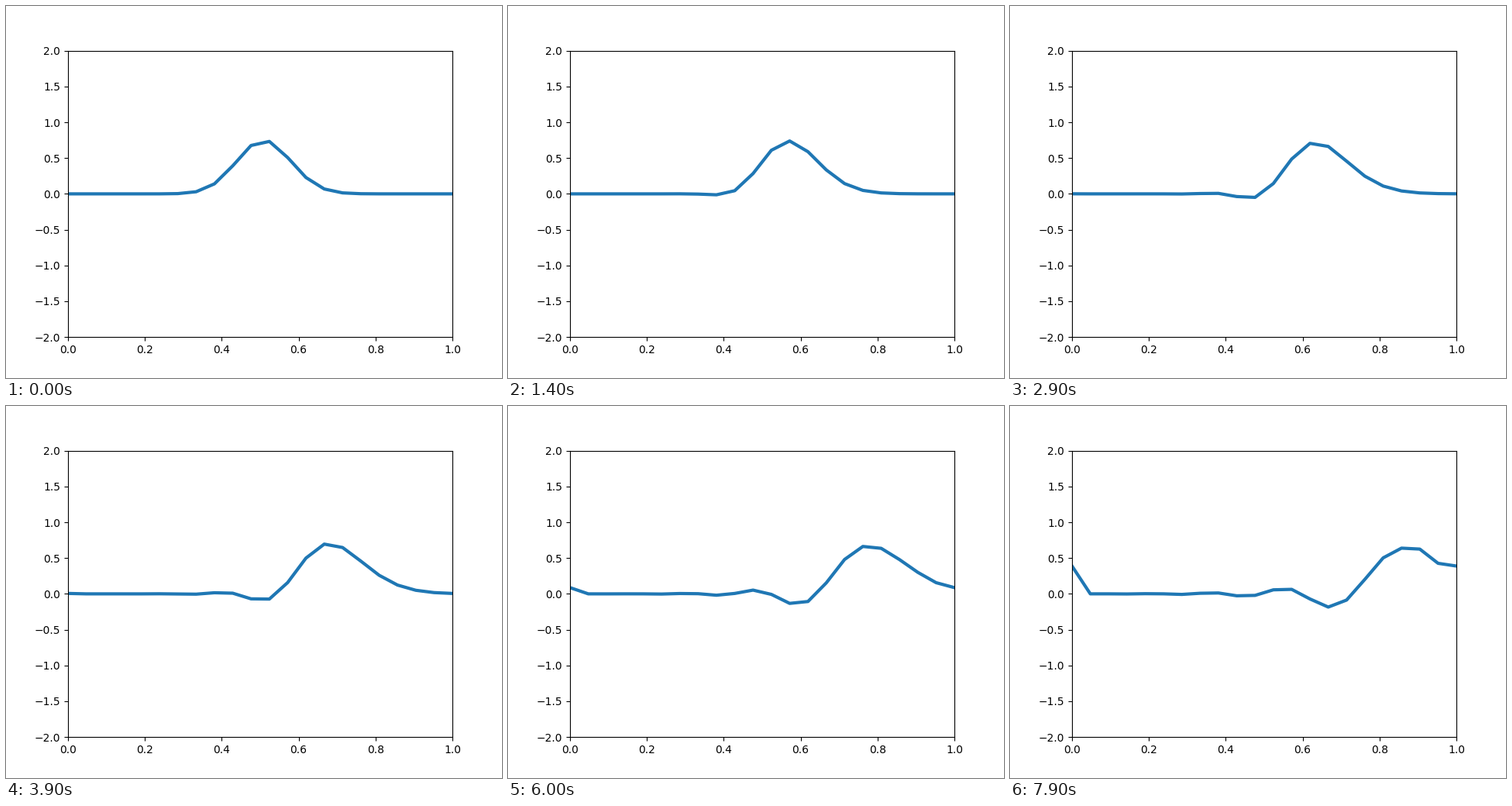
Write a matplotlib script that moves like this. It is 640 by 480 pixels and loops after 8 s.

```python
import numpy as np
import matplotlib.pyplot as plt
from matplotlib.animation import FuncAnimation

N = 22            # plotted nodes
FRAMES = 80
SPEED, DT = 1.0, 0.005
COURANT = SPEED * DT * N
START_STEPS = 2   # steps already taken when the loop opens

x = np.linspace(0, 1, N)


def solve():
    """Advect a Gaussian with central differences and Crank-Nicolson."""
    n = N - 1
    diff = (np.eye(n, k=1) - np.eye(n, k=-1)) * COURANT / 4
    step = np.linalg.solve(np.eye(n) + diff, np.eye(n) - diff)
    u = 0.75 * np.exp(-((x[1:] - 0.5) / 0.1) ** 2)
    states = []
    for _ in range(START_STEPS + FRAMES):
        states.append(np.append(u[-1], u))  # left end mirrors the right end
        u = step @ u
    return states[START_STEPS:]


states = solve()

fig = plt.figure(figsize=(6.4, 4.8), dpi=100)
ax = fig.add_subplot(xlim=(0, 1), ylim=(-2, 2))
line, = ax.plot(x, states[0], lw=3)


def update(i):
    line.set_ydata(states[i])
    return line,


anim = FuncAnimation(fig, update, frames=FRAMES, interval=100,
                     repeat=True, repeat_delay=0)
plt.show()
```
